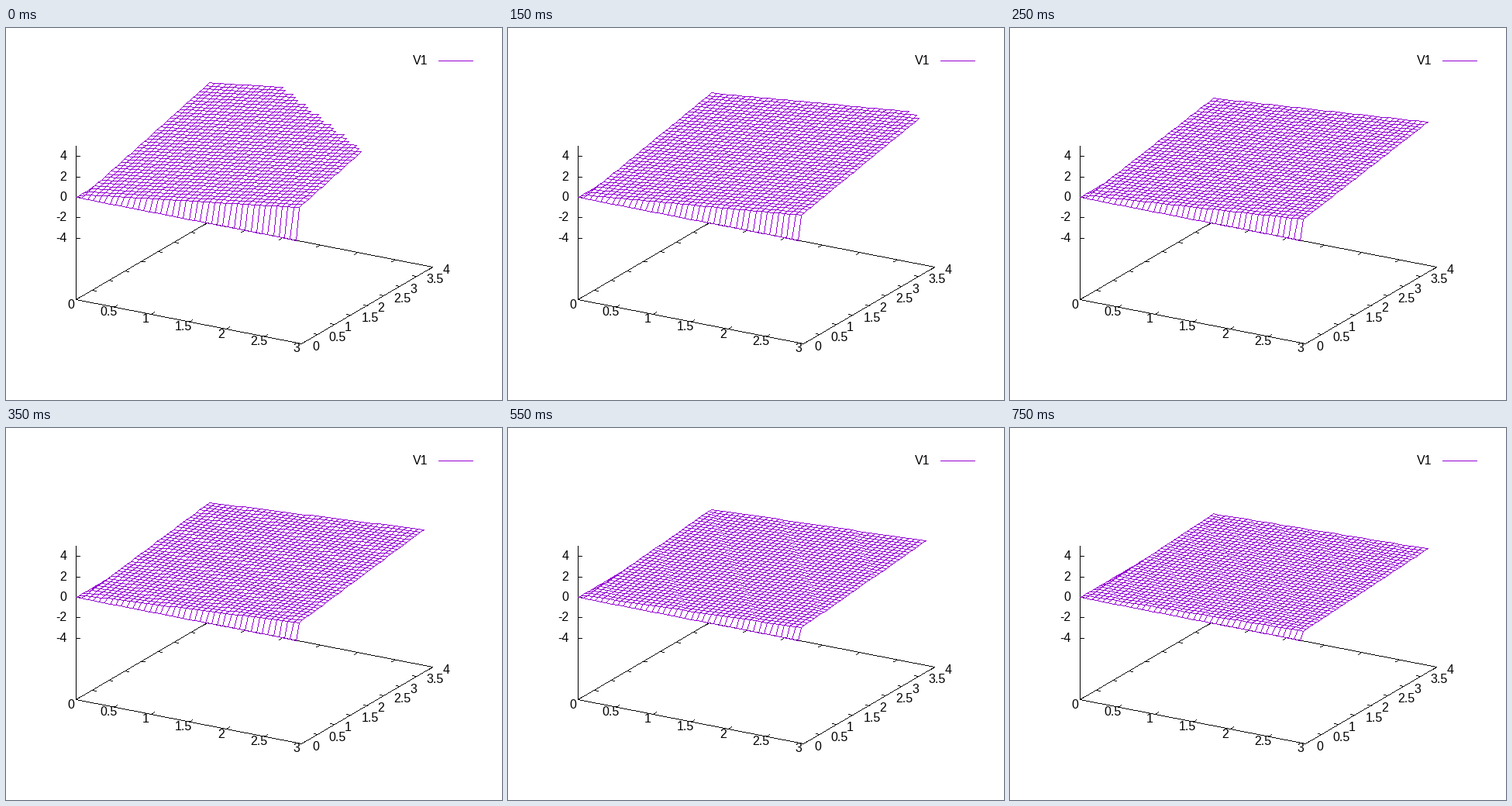
These frames come from a looping animation (640x480 px, 0.8 s). A matplotlib script:

```python
import numpy as np
import matplotlib.pyplot as plt
from matplotlib.animation import FuncAnimation

W, H, DPI = 640, 480, 100
PX = 72 / DPI
N = 40
FRAMES, INTERVAL = 16, 50
Z_MAX = 5
BLACK, VIOLET = (0, 0, 0), (148, 0, 211)

# Screen vectors of one unit along each axis
BASE = np.array([90.0, 350.0])
UX = np.array([291.0, 57.0]) / 3
UY = np.array([169.0, -99.0]) / 4
UZ = np.array([0.0, -13.2])

X, Y = np.meshgrid(np.arange(N) * 3 / N, np.arange(N) * 4 / N, indexing="ij")


def project(x, y, z=-10.0):
    """Screen position of a point; the base plane lies at z = -10."""
    x, y, z = (np.asarray(v, float)[..., None] for v in (x, y, z))
    return BASE + x * UX + y * UY + (z + 10) * UZ


def trace(segs):
    """Pixels of one-pixel lines, one step along the longer side at a time."""
    ends = np.floor(np.asarray(segs, float) + 0.5)
    start, delta = ends[:, 0], ends[:, 1] - ends[:, 0]
    count = np.maximum(np.abs(delta).max(axis=1), 1)[:, None]
    t = np.minimum(np.arange(count.max() + 1), count) / count
    pts = start[:, None] + t[..., None] * delta[:, None]
    return np.floor(pts + 0.5).astype(int).reshape(-1, 2)


def paint(canvas, pts, color):
    canvas[pts[:, 1], pts[:, 0]] = color


def label(x, y, text, ha="center"):
    ax.text(x, y + 5, text, ha=ha, va="baseline", color="black",
            family="Liberation Sans", fontsize=16 * PX, zorder=2)


def tick(at, direction, length=5):
    return [at, at + direction / np.hypot(*direction) * length]


def draw_axes(canvas):
    corners = [project(x, y) for x, y in ((0, 0), (3, 0), (3, 4), (0, 4))]
    segs = [[corners[i], corners[(i + 1) % 4]] for i in range(4)]
    segs.append([corners[0], project(0, 0, Z_MAX)])

    for v in np.arange(0, 3.1, 0.5):
        front = project(v, 0)
        segs += [tick(front, UY), tick(project(v, 4), -UY)]
        label(front[0] - 6.5, front[1] + 6.5, f"{v:g}")
    for v in np.arange(0, 4.1, 0.5):
        right = project(3, v)
        segs += [tick(right, -UX), tick(project(0, v), UX)]
        label(right[0] + 14, right[1] + 4, f"{v:g}", "left")
    for v in range(-4, 5, 2):
        at = project(0, 0, v)
        segs.append(tick(at, np.array([1.0, 0.0])))
        label(78.5, at[1], f"{v}", "right")

    paint(canvas, trace(segs), BLACK)


def edges(p, keep, axis):
    """Grid edges along one axis whose two ends are both kept."""
    p, keep = (np.moveaxis(a, axis, 0) for a in (p, keep))
    both = keep[:-1] & keep[1:]
    return np.stack([p[:-1][both], p[1:][both]], axis=1)


def left_of(pts, a, b):
    """Which points lie on the upper left side of the line from a to b."""
    d, r = b - a, pts - a
    return d[0] * r[:, 1] - d[1] * r[:, 0] <= 0


fig = plt.figure(figsize=(W / DPI, H / DPI), dpi=DPI, facecolor="white")
ax = fig.add_axes([0, 0, 1, 1])
ax.axis("off")

backdrop = np.full((H, W, 3), 255, np.uint8)
draw_axes(backdrop)
label(544, 42, "V1", "right")
paint(backdrop, trace([[(558, 42), (602, 42)]]), VIOLET)

picture = ax.imshow(backdrop, extent=(0, W, H, 0), aspect="auto",
                    interpolation="nearest", zorder=1)
ax.set_xlim(0, W)
ax.set_ylim(H, 0)


def update(frame):
    z = (X + Y) / 1.1 ** frame
    z[0, :] = z[:, 0] = 0
    keep = z < Z_MAX - 1e-9
    p = project(X, Y, z)
    canvas = backdrop.copy()

    # The steep strip at x = 0 faces away: only its outer part shows
    strip = trace(np.concatenate(
        [edges(p[:2], keep[:2], 0), edges(p[:1], keep[:1], 1)]))
    paint(canvas, strip[left_of(strip, p[1, 1], p[1, -1])], VIOLET)

    surface = np.concatenate(
        [edges(p[1:], keep[1:], 0), edges(p[1:], keep[1:], 1),
         edges(p[:2, :1], keep[:2, :1], 0)])
    paint(canvas, trace(surface), VIOLET)
    picture.set_data(canvas)
    return picture,


anim = FuncAnimation(fig, update, frames=FRAMES, interval=INTERVAL,
                     repeat=True, repeat_delay=0, blit=False)
plt.show()
```
